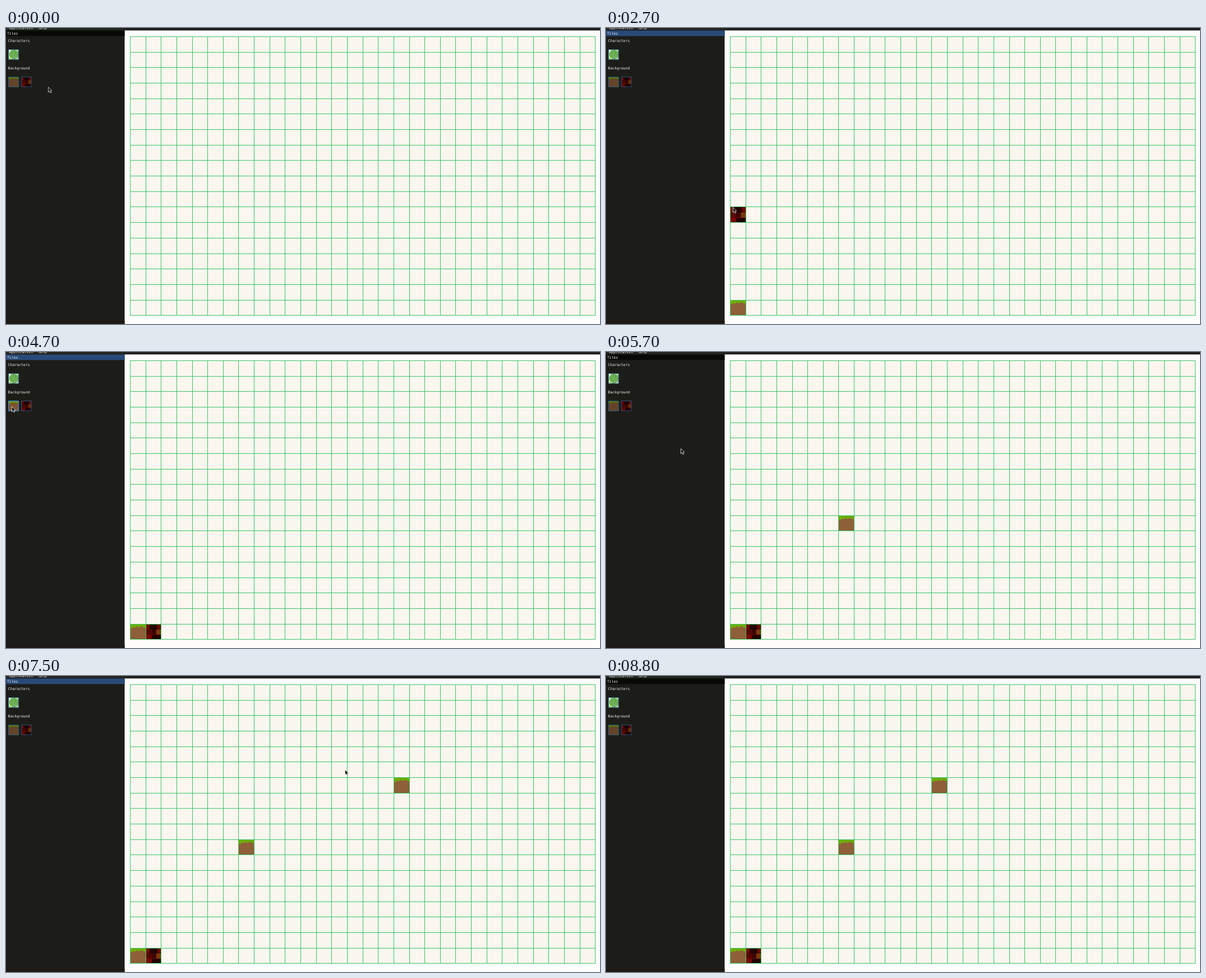
Recreate the animation shown at these times as an HTML page with a canvas. Size 1059 px wide and 529 px high, loop 9000 ms.

```html
<!DOCTYPE html>
<html lang="en">
<head>
<meta charset="utf-8">
<title>Tile editor</title>
<style>
  html, body { margin: 0; width: 100%; height: 100%; overflow: hidden; background: #fff; }
  canvas { display: block; width: 100vw; height: 100vh; }
</style>
</head>
<body>
<canvas id="stage" width="1059" height="529"></canvas>
<script>
const ctx = document.getElementById('stage').getContext('2d');
const STEP = 100, STEPS = 90;
const GRID = { x: 221.5, y: 15.5, cell: 27.64, rowHeight: 27.68, cols: 30, rows: 18 };

// Each drag owns the pointer path up to the next one: [step, x, y], linear in between
const DRAGS = [
  {
    draw: drawDirt, start: 6, end: 16,
    path: [[1, 75, 105], [4, 15, 97], [6, 12, 98], [10, 228, 440], [11, 256, 490],
      [13, 236, 488], [14, 236, 488], [15, 233, 489], [16, 231, 486]]
  },
  {
    draw: drawLava, start: 24, end: 34,
    path: [[18, 183, 346], [19, 183, 346], [22, 47, 118], [23, 47, 118], [24, 35, 97],
      [26, 224, 325], [27, 226, 320], [31, 271, 489], [33, 268, 487], [35, 269, 487]]
  },
  {
    draw: drawDirt, start: 46, end: 57,
    path: [[42, 20, 73], [43, 1, 85], [45, 10, 97], [47, 10, 97], [51, 395, 325],
      [53, 434, 297], [54, 434, 297], [55, 426, 295], [56, 426, 295]]
  },
  {
    draw: drawDirt, start: 62, end: 82,
    path: [[57, 133, 172], [61, 10, 97], [62, 10, 97], [65, 508, 262], [66, 512, 280],
      [69, 640, 470], [71, 840, 350], [73, 800, 85], [74, 705, 195], [75, 604, 167],
      [76, 459, 250], [77, 535, 385], [78, 680, 388], [79, 735, 290], [80, 600, 195],
      [83, 595, 199], [87, 30, 26]]
  }
];

function pointerAt(step) {
  const path = DRAGS.flatMap(d => d.path);
  const i = path.findIndex(p => p[0] >= step);
  if (i < 0) return null;
  const b = path[i], a = path[Math.max(0, i - 1)];
  const k = b === a ? 0 : (step - a[0]) / (b[0] - a[0]);
  return { x: a[1] + (b[1] - a[1]) * k, y: a[2] + (b[2] - a[2]) * k };
}

function rect(color, x, y, w, h) {
  ctx.fillStyle = color;
  ctx.fillRect(x, y, w, h);
}

// Runs a drawing made on a 28-unit square inside the given box
function inBox(x, y, w, h, draw) {
  ctx.save();
  ctx.translate(x, y);
  ctx.scale(w / 28, h / 28);
  draw();
  ctx.restore();
}

function drawDirt() {
  rect('#6ead08', 0, 0, 28, 28);
  ctx.fillStyle = '#8e5f39';
  ctx.fill(new Path2D('M0 8H3L5 6 10 6.5 12 3 14 6.5 21 4 24 6 28 7V28H0Z'));
}

function drawLava() {
  rect('#560606', 0, 0, 28, 28);
  rect('#750505', 0, 0, 7, 9);
  rect('#240202', 7, 0, 14, 10);
  rect('#700404', 21, 0, 7, 9);
  rect('#3c0404', 11, 10, 8, 8);
  rect('#7d3b0c', 19, 10, 9, 9);
  rect('#790606', 0, 19, 11, 9);
  rect('#210202', 11, 20, 17, 8);
}

function drawSpiral() {
  const shade = ctx.createLinearGradient(0, 0, 28, 28);
  shade.addColorStop(0, '#f3fff0');
  shade.addColorStop(.5, '#b9ec88');
  shade.addColorStop(1, '#edffe6');
  rect(shade, 0, 0, 28, 28);
  ctx.beginPath();
  for (let a = 0; a < Math.PI * 6.6; a += .1) {
    const r = 1 + a * .57;
    ctx.lineTo(14 + r * Math.cos(a), 14 + r * Math.sin(a));
  }
  ctx.strokeStyle = '#217a16';
  ctx.lineWidth = 2;
  ctx.stroke();
}

function drawIcon(x, y, draw, dim, hovered) {
  inBox(x, y, 18.5, 18.5, draw);
  rect(`rgba(10,10,8,${hovered ? .12 : dim})`, x, y, 18.5, 18.5);
  ctx.strokeStyle = hovered ? '#4296fa' : '#2b5183';
  ctx.lineWidth = 1;
  ctx.strokeRect(x + .5, y + .5, 17.5, 17.5);
}

function label(text, x, y) {
  ctx.fillStyle = '#f4f4f0';
  ctx.fillText(text, x, y);
}

function drawPanel(active, pointer) {
  rect('#1c1d18', 0, 4, 211.5, 525);
  rect('#1d1917', 0, 523.5, 211.5, 5.5);
  rect('#231f1f', 0, 0, 1059, 4.4);
  rect('#242522', 0, 0, 211.5, 4.4);
  rect(active ? '#294a7a' : '#080a06', 0, 4.6, 211.5, 9.8);

  ctx.font = '6.43px "DejaVu Sans Mono", monospace';
  label('Application', 5.5, 2);
  label('Help', 57.5, 2);
  label('Tiles', 2, 11.7);
  label('Characters', 3.8, 25);
  label('Background', 3.8, 74.2);

  const over = x => Boolean(active && pointer && pointer.x >= x && pointer.x < x + 18.5 &&
    pointer.y >= 87 && pointer.y < 105.5);
  drawIcon(4, 38, drawSpiral, 0, false);
  drawIcon(4, 87, drawDirt, .32, over(4));
  drawIcon(27, 87, drawLava, .2, over(27));
}

function drawGrid() {
  const { x, y, cell, rowHeight, cols, rows } = GRID;
  ctx.beginPath();
  for (let c = 0; c <= cols; c++) {
    const lx = Math.floor(x + c * cell) + .5;
    ctx.moveTo(lx, y);
    ctx.lineTo(lx, y + rows * rowHeight);
  }
  for (let r = 0; r <= rows; r++) {
    const ly = Math.floor(y + r * rowHeight) + .5;
    ctx.moveTo(x, ly);
    ctx.lineTo(x + cols * cell, ly);
  }
  ctx.strokeStyle = '#38c464';
  ctx.lineWidth = 1;
  ctx.stroke();
}

// A dragged tile snaps to the cell the pointer was in one step earlier
function drawDragged(drag, step) {
  if (step <= drag.start) return;
  const p = pointerAt(Math.min(step, drag.end - 1) - 1);
  const col = Math.floor((p.x - GRID.x) / GRID.cell);
  const row = Math.floor((p.y - GRID.y) / GRID.rowHeight);
  if (col < 0 || row < 0 || row >= GRID.rows) return;
  inBox(GRID.x + col * GRID.cell, GRID.y + row * GRID.rowHeight, GRID.cell, GRID.rowHeight, drag.draw);
}

const ARROW = new Path2D('M.4 .6V9.6L2.5 7.7 4 11 5.6 10.3 4.2 7.1 6.8 7Z');

function drawPointer({ x, y }) {
  ctx.save();
  ctx.translate(x, y);
  ctx.fillStyle = '#0b0b0b';
  ctx.fill(ARROW);
  ctx.strokeStyle = '#f2f2f2';
  ctx.lineWidth = .8;
  ctx.stroke(ARROW);
  ctx.restore();
}

function render(step) {
  const pointer = pointerAt(step);
  const active = DRAGS.some(d => step >= d.start && step < d.end);
  rect('#fffefd', 0, 0, 1059, 529);
  rect('#fbf6ef', GRID.x, GRID.y, GRID.cols * GRID.cell, GRID.rows * GRID.rowHeight);
  DRAGS.forEach(d => drawDragged(d, step));
  drawGrid();
  drawPanel(active, pointer);
  if (pointer) drawPointer(pointer);
}

const startTime = performance.now();
function tick() {
  const elapsed = Math.max(0, performance.now() - startTime);
  render(Math.floor(elapsed / STEP) % STEPS);
  requestAnimationFrame(tick);
}
tick();
</script>
</body>
</html>
```
